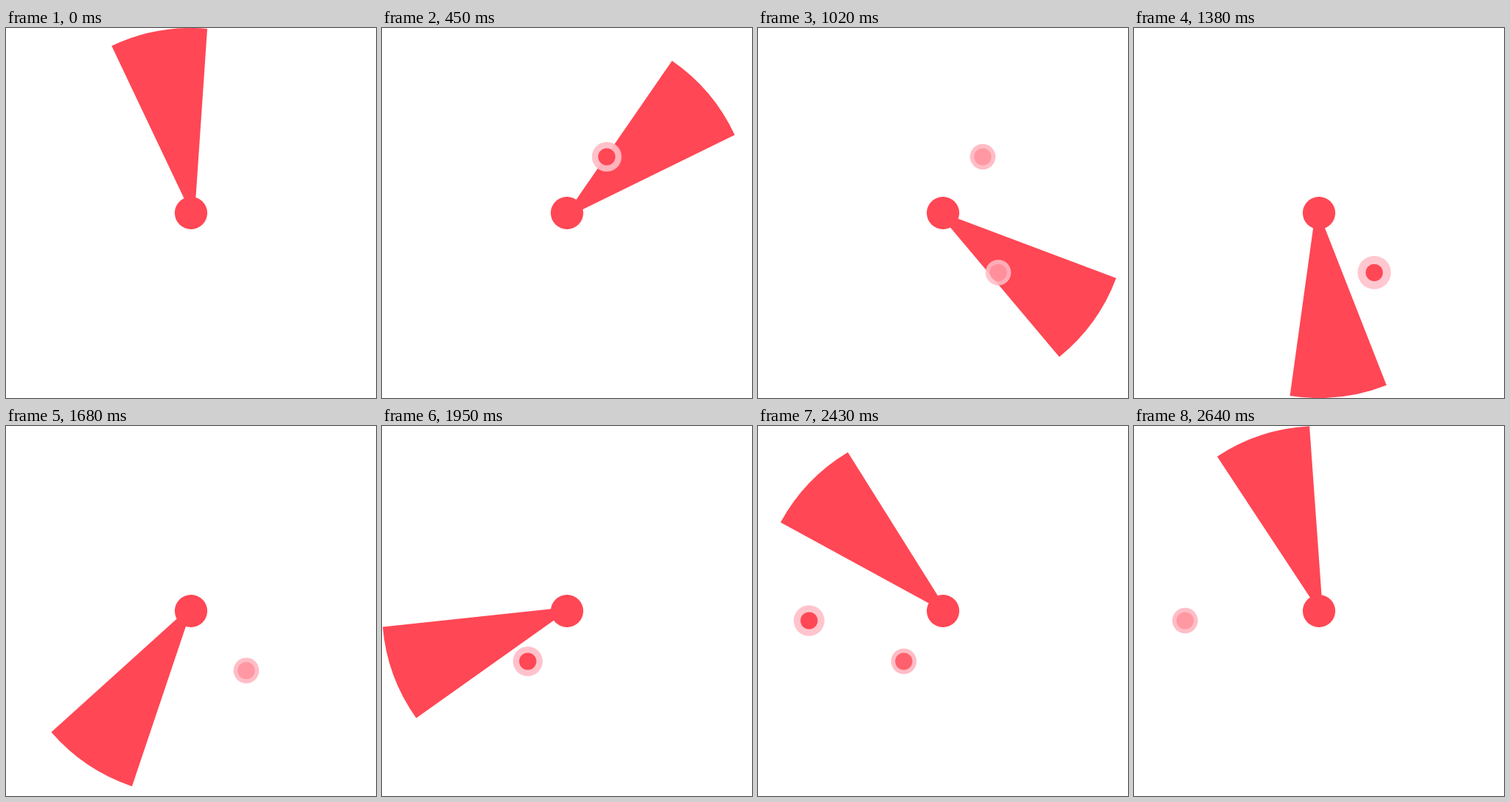
These frames come from a looping animation (500x500 px, 2670 ms). An HTML page with a canvas:

```html
<!DOCTYPE html>
<html>
<head>
<meta charset="utf-8">
<title>Radar sweep</title>
<style>
  html, body { margin: 0; width: 100%; height: 100%; overflow: hidden; background: #fff; }
  canvas { display: block; }
</style>
</head>
<body>
<canvas id="stage" width="500" height="500"></canvas>
<script>
const ctx = document.getElementById('stage').getContext('2d');
const LOOP = 2670, TICK = 30, LIFE = 750;
const RED = '#ff4755', PINK = '#ffbdc6';
const CENTER = 250, SWEEP = 29.3, HAND_HALF_WIDTH = 5;

const blips = [
  { x: 303.7, y: 174, start: 330 },
  { x: 324.7, y: 330.5, start: 990 },
  { x: 197, y: 318, start: 1830 },
  { x: 69, y: 263, start: 1950 },
];

const clamp = v => Math.max(0, Math.min(1, v));
const radians = deg => (deg - 90) * Math.PI / 180;

function disc(x, y, r, color, alpha = 1) {
  ctx.globalAlpha = alpha;
  ctx.fillStyle = color;
  ctx.beginPath();
  ctx.arc(x, y, r, 0, 2 * Math.PI);
  ctx.fill();
  ctx.globalAlpha = 1;
}

// A sector behind a hand of constant width, so the front edge runs beside the center.
function drawWedge(angle) {
  const side = radians(angle + 90);
  const tip = Math.asin(HAND_HALF_WIDTH / CENTER);
  ctx.fillStyle = RED;
  ctx.beginPath();
  ctx.moveTo(CENTER, CENTER);
  ctx.arc(CENTER, CENTER, 250, radians(angle - SWEEP), radians(angle) + tip);
  ctx.lineTo(CENTER + HAND_HALF_WIDTH * Math.cos(side), CENTER + HAND_HALF_WIDTH * Math.sin(side));
  ctx.fill();
}

function drawBlip({ x, y, start }, time) {
  const age = time - start;
  if (age <= 0 || age >= LIFE) return;
  const swell = Math.sin(Math.PI * clamp((age - 30) / 570));
  const ringFade = clamp(Math.min(age, LIFE - age) / 35);
  const coreFade = clamp(Math.min(age / 110, (LIFE - age) / 190));
  disc(x, y, 17.3 + 5.7 * swell, PINK, (1 - 0.17 * swell) * ringFade);
  disc(x, y, 11.6, RED, coreFade);
}

function draw() {
  const time = Math.floor(performance.now() % LOOP / TICK) * TICK;
  ctx.clearRect(0, 0, 500, 500);
  drawWedge(3.9 + time / TICK * 4);
  disc(CENTER, CENTER, 22, RED);
  blips.forEach(blip => drawBlip(blip, time));
  requestAnimationFrame(draw);
}
draw();
</script>
</body>
</html>
```
